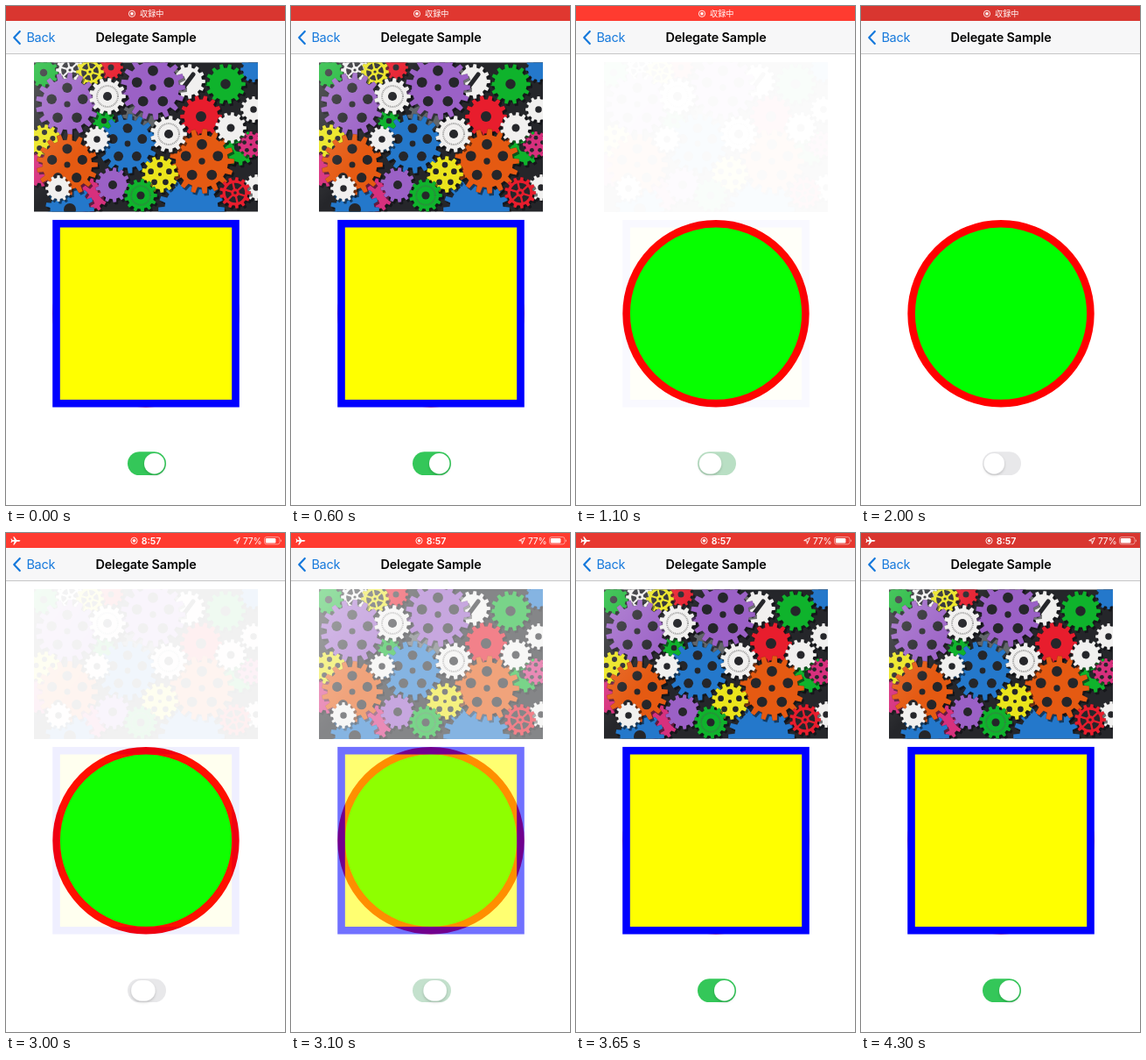
Write an HTML page that moves like this. It is 319 px wide and 569 px high and loops after 4.35 s.

```html
<!DOCTYPE html>
<html lang="en">
<head>
<meta charset="utf-8">
<title>Delegate Sample</title>
<style>
html, body { margin: 0; width: 100%; height: 100%; overflow: hidden; background: #fff; }
svg { display: block; width: 100%; height: 100%; }
text { font-family: Inter, "Liberation Sans", sans-serif; }
.jp { font-family: "Noto Sans CJK JP", "Noto Sans CJK", sans-serif; }
</style>
</head>
<body>
<svg viewBox="0 0 319 569">
  <defs>
    <clipPath id="photoClip"><rect x="32" y="64.5" width="256" height="170"/></clipPath>
    <linearGradient id="sheen" x2="1" y2=".5">
      <stop offset="0" stop-color="#fff" stop-opacity=".24"/>
      <stop offset=".4" stop-color="#fff" stop-opacity="0"/>
    </linearGradient>
    <filter id="soft" x="-30%" y="-30%" width="160%" height="180%">
      <feDropShadow dx="0" dy="1.5" stdDeviation="1.5" flood-opacity=".2"/>
    </filter>
  </defs>
  <rect width="319" height="569" fill="#fff"/>

  <rect id="bar" width="319" height="17"/>
  <g id="recording" fill="#fff">
    <circle cx="144" cy="8.8" r="3.6" fill="none" stroke="#fff" stroke-width=".9"/>
    <circle cx="144" cy="8.8" r="1.8"/>
    <text class="jp" x="153" y="12.3" font-size="9.2">収録中</text>
  </g>
  <g id="clock" fill="#fff">
    <path d="M16.5 8.8q-.7-.9-1.8-.9h-2.4L9.4 4.2H8.2l1.4 3.7H7.4L6.3 6.6h-.8l.7 2.2-.7 2.2h.8l1.1-1.3h2.2l-1.4 3.7h1.2l2.9-3.7h2.4q1.1 0 1.8-.9Z"/>
    <circle cx="146.5" cy="8.8" r="3.6" fill="none" stroke="#fff" stroke-width=".9"/>
    <circle cx="146.5" cy="8.8" r="1.8"/>
    <text x="154.7" y="12.7" font-size="10.6" font-weight="600">8:57</text>
    <path d="M267.3 5.4l-6.6 3.2 3.3.3.3 3.4Z" fill="none" stroke="#fff" stroke-width=".9"/>
    <text x="271" y="12.6" font-size="10.3" letter-spacing="-.2">77%</text>
    <rect x="295.5" y="4.6" width="17.5" height="8.2" rx="2.4" fill="none" stroke="#fff" stroke-opacity=".6" stroke-width=".8"/>
    <rect x="296.8" y="5.9" width="11.6" height="5.6" rx="1.3"/>
    <path d="M314 7.2q2 1.5 0 3Z" opacity=".6"/>
  </g>

  <rect y="17" width="319" height="37.5" fill="#f7f7f8"/>
  <rect y="54" width="319" height=".8" fill="#b9b9bb"/>
  <path d="M15.8 29l-6.6 7 6.6 7" fill="none" stroke="#1679dc" stroke-width="2.2" stroke-linecap="round" stroke-linejoin="round"/>
  <text x="23.4" y="41" font-size="14.5" letter-spacing="-.3" fill="#1679dc">Back</text>
  <text x="160" y="41" font-size="14.4" font-weight="600" letter-spacing="-.15" text-anchor="middle">Delegate Sample</text>

  <circle cx="160" cy="350.7" r="102.4" fill="#0f0" stroke="#f00" stroke-width="8.6"/>
  <g id="fading">
    <g id="photo" clip-path="url(#photoClip)"></g>
    <rect x="57.5" y="248.2" width="205" height="205" fill="#ff0" stroke="#00f" stroke-width="8.6"/>
  </g>

  <rect id="track" x="139" y="508.3" width="44" height="26.8" rx="13.4"/>
  <rect id="knob" y="510" height="23.4" rx="11.7" fill="#fff" filter="url(#soft)"/>
</svg>
<script>
const $ = id => document.getElementById(id);
const LOOP = 4350, STEP = 50, PULSE = 2000;
const DARK = '#25262a';
const purple = '#9b61c6', white = '#f1f0ef', blue = '#2478cb', orange = '#e55a12',
      yellow = '#ebe51c', green = '#0fb32c', red = '#e81d2d', pink = '#d7307d', grey = '#62666b';

// x, y, radius, colour, face
const gears = [
  [155, 126, 22, grey, 'plain'], [40, 186, 20, pink, 'plain'], [96, 216, 20, pink, 'plain'],
  [43, 76, 17, green, 'hub'], [120, 70, 14, red, 'hub'], [283, 72, 15, blue, 'plain'],
  [112, 131, 13, green, 'hub'], [73, 232, 28, blue, 'hub'], [212, 232, 38, blue, 'plain'],
  [251, 89, 23, green, 'hub'], [266, 161, 21, green, 'hub'], [280, 158, 15, pink, 'holes'],
  [73, 73, 16, white, 'spokes'], [96, 75, 16, yellow, 'spokes'],
  [286, 207, 15, white, 'hub'], [283, 118, 15, white, 'hub'],
  [208, 86, 20, white, 'slot'], [70, 112, 36, purple, 'holes'], [168, 93, 37, purple, 'holes'],
  [223, 126, 24, red, 'hub'], [139, 157, 34, blue, 'holes'], [44, 154, 19, yellow, 'holes'],
  [70, 181, 35, orange, 'holes'], [224, 177, 37, orange, 'holes'], [257, 139, 18, white, 'hub'],
  [116, 103, 21, white, 'label'], [186, 146, 21, white, 'label'], [104, 152, 15, white, 'hub'],
  [60, 208, 15, white, 'hub'], [122, 204, 20, purple, 'hub'], [176, 192, 21, yellow, 'holes'],
  [154, 216, 19, green, 'label'], [262, 213, 18, red, 'spokes']
];

const polar = (r, a) => `${(r * Math.cos(a)).toFixed(1)} ${(r * Math.sin(a)).toFixed(1)}`;
const dot = (r, x = 0, y = 0, fill = DARK) => `<circle cx="${x}" cy="${y}" r="${r}" fill="${fill}"/>`;

function toothPath(r) {
  const teeth = Math.round(8 + r / 4), pitch = 2 * Math.PI / teeth, points = [];
  for (let i = 0; i < teeth; i++) {
    const a = i * pitch;
    points.push(polar(r * .81, a - pitch * .3), polar(r, a - pitch * .19),
                polar(r, a + pitch * .19), polar(r * .81, a + pitch * .3));
  }
  return `M${points.join('L')}Z`;
}

function around(count, offset, draw) {
  return Array.from({ length: count }, (_, i) => draw(offset + i * 2 * Math.PI / count)).join('');
}

const faces = {
  plain: () => '',
  hub: r => dot(r * .25),
  holes: r => dot(r * .1) +
    around(5, -Math.PI / 2, a => dot(r * .16, r * .52 * Math.cos(a), r * .52 * Math.sin(a))),
  slot: r => `<path d="M${-r * .3} ${r * .4}L${r * .3} ${-r * .4}" stroke="${DARK}" stroke-width="5" stroke-linecap="round"/>`,
  label: r => dot(r * .24) +
    `<circle r="${r * .57}" fill="none" stroke="#555" stroke-width="2" stroke-dasharray="1 .9" opacity=".55"/>`,
  spokes: (r, color) => dot(r * .62) +
    around(6, .3, a => `<path d="M0 0L${polar(r * .68, a)}" stroke="${color}" stroke-width="${r * .13}"/>`) +
    dot(r * .26, 0, 0, color) + dot(r * .1)
};

function gear([x, y, r, color, face]) {
  const d = toothPath(r);
  return `<g transform="translate(${x} ${y})">
    <path d="${d}" transform="translate(2 2.5)" fill="#090a0d" opacity=".55"/>
    <path d="${d}" fill="${color}" stroke="#000" stroke-opacity=".18" stroke-width=".7"/>
    ${faces[face](r, color)}</g>`;
}

const photoRect = fill => `<rect x="32" y="64" width="256" height="171" fill="${fill}"/>`;
$('photo').innerHTML = photoRect(DARK) + gears.map(gear).join('') + photoRect('url(#sheen)');

function ease(t, from, to) {
  const p = Math.min(1, Math.max(0, (t - from) / (to - from)));
  return p * p * (3 - 2 * p);
}

function mix(a, b, p) {
  return `rgb(${a.map((v, i) => Math.round(v + (b[i] - v) * p))})`;
}

function render(t) {
  const phase = t % PULSE;
  const pulse = ease(phase, 450, 1000) - ease(phase, 1300, 1900);
  $('bar').setAttribute('fill', mix([217, 54, 48], [255, 59, 48], pulse));
  $('recording').style.display = t < 2300 ? '' : 'none';
  $('clock').style.display = t < 2300 ? 'none' : '';

  $('fading').setAttribute('opacity', 1 - ease(t, 865, 1125) + ease(t, 2960, 3220));

  const lit = 1 - ease(t, 880, 1210) + ease(t, 3000, 3350);
  const slide = 1 - ease(t, 860, 1120) + ease(t, 2930, 3180);
  const press = ease(t, 780, 900) - ease(t, 1000, 1200) + ease(t, 2850, 2980) - ease(t, 3050, 3220);
  const width = 23.4 + 4 * press;
  $('track').setAttribute('fill', mix([232, 232, 234], [52, 199, 89], lit));
  $('knob').setAttribute('width', width);
  $('knob').setAttribute('x', 140.6 + slide * (40.8 - width));
}

let start;
function tick(now) {
  start ??= now;
  const t = (now - start) % LOOP;
  render(Math.floor(t / STEP) * STEP);
  requestAnimationFrame(tick);
}
render(0);
requestAnimationFrame(tick);
</script>
</body>
</html>
```
